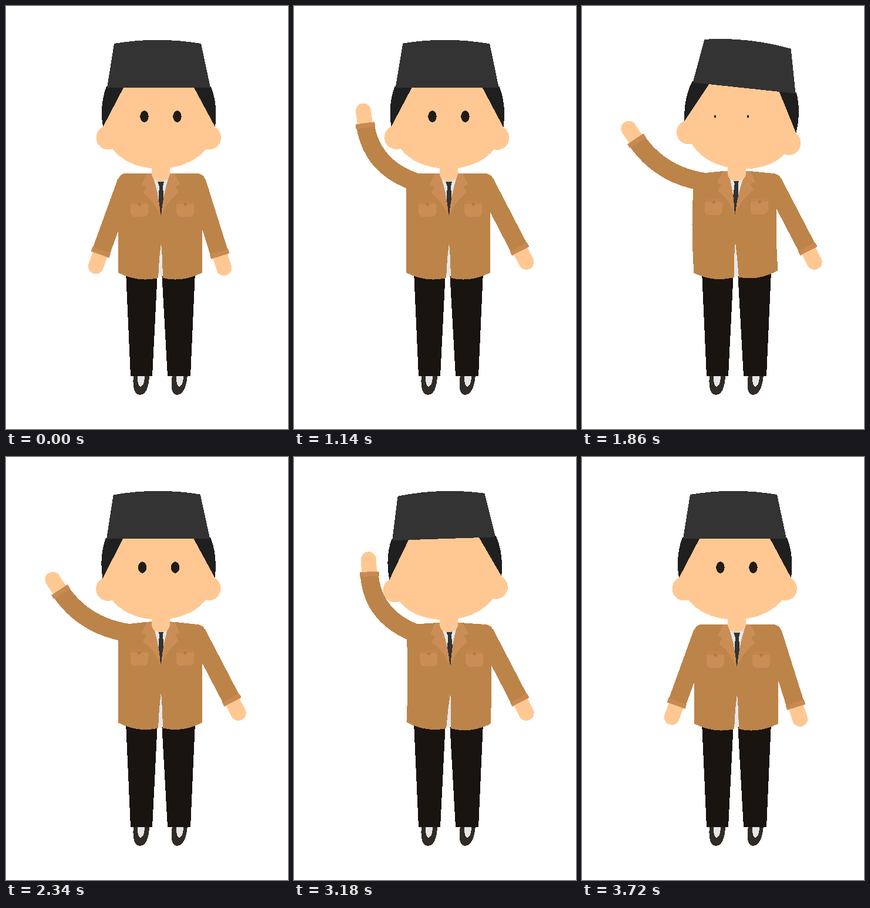
An HTML page that plays this animation: 480x720 px, repeating every 3.75 s.

```html
<!DOCTYPE html>
<html lang="en">
<head>
<meta charset="utf-8">
<title>Waving man</title>
<style>
  html, body { margin: 0; width: 100%; height: 100%; overflow: hidden; background: #fff; }
  svg { display: block; width: 480px; height: 720px; shape-rendering: crispEdges; }
  .skin { fill: #ffc893; }
  .jacket { fill: #bc8449; }
  .trim { fill: #cb8d56; }
  .dark { fill: #333; }
  .hair { fill: #1f1f1f; }
  .pants { fill: #1a1410; }
  .shoe { fill: #2f2b26; }
  .shirt { fill: #e6e6e6; }
  .flap { fill: #c2854d; }
  .button { fill: #b97644; }
  .arm path { fill: none; }
  .hand { stroke: #ffc893; stroke-width: 26; stroke-linecap: round; }
  .sleeve { stroke: #bc8449; stroke-width: 31; }
  .cuff { stroke: #c98a51; stroke-width: 33; }
</style>
</head>
<body>
<svg viewBox="0 0 480 720">
  <g>
    <path class="shoe" d="M217,628Q214,661 228,662Q243,661 244,628Z M283,628Q278,661 291,662Q306,661 309,628Z"/>
    <path class="shirt" d="M224,628Q223,646 229,648Q236,646 236,628Z M290,628Q289,646 295,648Q302,646 302,628Z"/>
    <path class="pants" d="M204,452H258L249,630H212Z M265,452H322L314,630H275Z"/>
    <path class="shirt" d="M258,398H270V460H258Z"/>
  </g>
  <g class="arm" id="left"><path class="hand"/><path class="sleeve"/><circle class="jacket" r="14.5"/><path class="cuff"/></g>
  <g class="arm" id="right"><path class="hand"/><path class="sleeve"/><circle class="jacket" r="15"/><path class="cuff"/></g>
  <g id="torso">
    <path class="jacket" d="M204,285 L240,285 L287,285 L326,285 L334,297 L334,345 L334,375 L334,405 L334,430 L334,454 Q300,471 267,463 L266,430 L264,403 L261,430 L259,463 Q225,471 191,454 L191,430 L191,405 L191,375 L191,345 L191,297Z"/>
    <path class="shirt" d="M248,285 L264,357 L279,285Z"/>
    <path class="dark" d="M258,299 L269,299 L267,307 L269,335 L264,358 L259,335 L261,307Z"/>
    <path class="trim" d="M240,285 L231,304 L239,308 L233,318 Q255,335 263,358 Q261,320 248,285Z M287,285 L296,303 L288,307 L294,317 Q272,335 264,358 Q267,320 279,285Z"/>
    <path class="flap" d="M212,338 L214,331 L240,331 L242,338Z M290,338 L292,331 L318,331 L320,338Z"/>
    <path class="trim" d="M212,337 L222,337 L227,341 L232,337 L242,337 L242,350 Q242,359 232,359 L222,359 Q212,359 212,350Z M290,337 L300,337 L305,341 L310,337 L320,337 L320,350 Q320,359 310,359 L300,359 Q290,359 290,350Z"/>
    <path class="button" d="M224,337 L227,334 L230,337 L227,340Z M302,337 L305,334 L308,337 L305,340Z"/>
  </g>
  <path class="skin" d="M248,265V286Q250,298 263,298Q277,298 279,286V265Z"/>
  <g id="head">
    <circle class="skin" cx="174" cy="224" r="20.5"/>
    <circle class="skin" cx="345.5" cy="224" r="20.5"/>
    <path class="skin" d="M200,137L165,206Q168,228 182,244C215,288 305,288 340,244Q354,228 356,206L320,137Z"/>
    <path class="hair" d="M171,137Q159,168 165,206L201,137Z M349,137Q361,168 356,206L319,137Z"/>
    <path class="dark" d="M184,64Q258,51.5 332,64L348,139H172Z"/>
  </g>
  <g fill="#231b16">
    <ellipse class="eye" cx="235.5" cy="188"/>
    <ellipse class="eye" cx="291.5" cy="188"/>
  </g>
</svg>
<script>
const LOOP = 3750, STEP = 30;
const $ = id => document.getElementById(id);
const clamp = x => Math.min(1, Math.max(0, x));
const ease = x => x < .5 ? 4 * x ** 3 : 1 - 4 * (1 - x) ** 3;

// Each move is [start, end, value]; the track begins at `from`.
const track = (t, from, ...moves) => moves.reduce(
  (v, [start, end, to]) => v + (to - v) * ease(clamp((t - start) / (end - start))), from);

const torso = [...$('torso').children].map(el => [el, el.getAttribute('d')]);
const eyes = [...document.querySelectorAll('.eye')].map(el => [el, +el.getAttribute('cx')]);

// Angles are measured from straight down; side is -1 for left, 1 for right.
function poseArm(id, side, x, y, angle, bend) {
  const move = ([px, py], deg, r) => {
    const a = deg * Math.PI / 180;
    return [px + side * r * Math.sin(a), py + r * Math.cos(a)];
  };
  const first = angle - bend / 2, last = angle + bend / 2;
  const elbow = move([x, y], first, 66 + .2 * bend);
  const wrist = move(elbow, last, 66 + .13 * bend);
  const [hand, sleeve, shoulder, cuff] = $(id).children;
  hand.setAttribute('d', `M${move(wrist, last, -4)}L${move(wrist, last, 21)}`);
  sleeve.setAttribute('d', `M${x},${y}Q${elbow} ${wrist}`);
  cuff.setAttribute('d', `M${move(wrist, last, -8)}L${wrist}`);
  shoulder.setAttribute('cx', x);
  shoulder.setAttribute('cy', y);
}

// Bends the middle sideways and lifts the chest while the shoulders stay put.
function poseTorso(sway, lift) {
  const warp = (_, x, y) => {
    const h = (y - 285) / 180, side = x - 263;
    const pinned = (1 - h) ** 8 * clamp((side / 62) ** 2);
    return [+x + sway * Math.sin(Math.PI * clamp(h)),
      y - lift * (1 - .7 * h) * (1 - pinned) + sway * h * side / 110].map(n => n.toFixed(2));
  };
  for (const [el, d] of torso) el.setAttribute('d', d.replace(/(\d+),(\d+)/g, warp));
}

function draw(t) {
  const wave = t > 1220 && t < 2980 ? (1 - Math.cos((t - 1220) / 440 * Math.PI)) / 2 : 0;
  const angle = track(t, 19.9, [180, 1290, 142], [2540, 3000, 145], [3120, 3720, 19.9]);
  const bend = track(t, 0, [700, 1230, 64], [2540, 3000, 66], [3120, 3660, 0]);
  poseArm('left', -1, 205, 299, angle - 33 * wave, bend - 30 * wave);
  poseArm('right', 1, 325, 300, track(t, 17.5, [180, 1290, 27.5], [3120, 3720, 17.5]), 0);

  poseTorso(
    track(t, 0, [1230, 1800, -3.5], [1930, 2735, 3], [2900, 3700, 0]),
    track(t, 0, [1230, 2100, 5], [2750, 3700, 0]));

  const tilt = track(t, 0, [960, 1740, 6.1], [1930, 2735, -6.1], [2735, 3510, 0]);
  $('head').setAttribute('transform', `rotate(${tilt} 263 290)`);

  const look = track(t, 0, [1230, 1800, -9], [2000, 2800, 9], [2850, 3600, 0]);
  const open = Math.min(...[560, 1885, 3180].map(blink => clamp(Math.abs(t - blink) / 110)));
  for (const [el, x] of eyes) {
    el.setAttribute('cx', x + look);
    el.setAttribute('rx', 7.2 * open);
    el.setAttribute('ry', 9.8 * open);
  }
}

const began = performance.now();
function tick() {
  const t = (performance.now() - began) % LOOP;
  draw(Math.floor(t / STEP) * STEP);
  requestAnimationFrame(tick);
}
tick();
</script>
</body>
</html>
```
